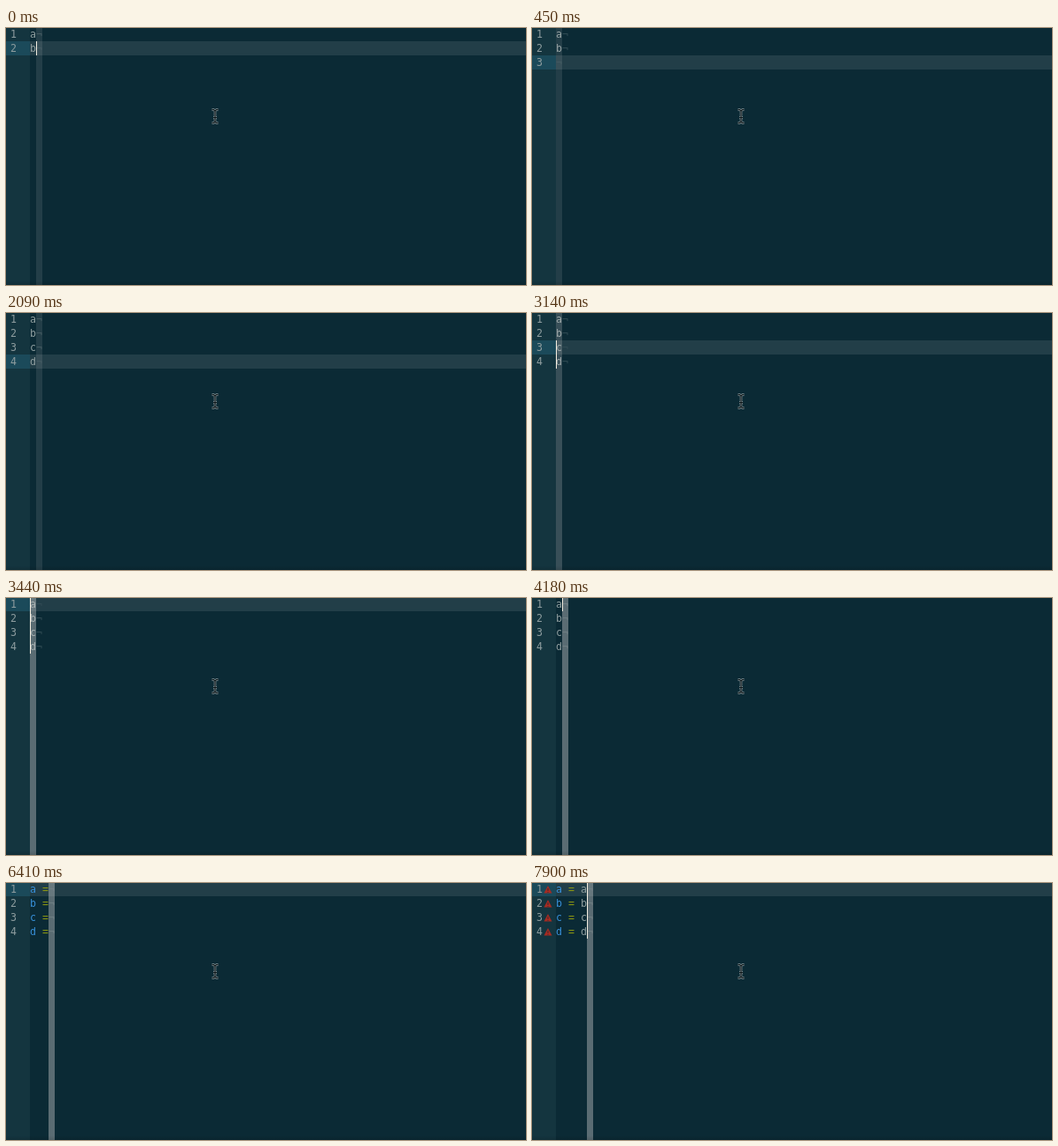
An HTML page with a canvas that plays this animation: 587x291 px, repeating every 8 s.

```html
<!DOCTYPE html>
<html lang="en">
<head>
<meta charset="utf-8">
<title>Multiple cursors</title>
<style>
  html, body { margin: 0; height: 100%; overflow: hidden; background: #0b2a35; }
  canvas { display: block; }
</style>
</head>
<body>
<canvas id="stage" width="587" height="291"></canvas>
<script>
const ctx = document.getElementById('stage').getContext('2d');
const W = 587, H = 291, GUTTER = 27, CELL = 7, ROW = 16, LOOP = 8000;
const rowTop = row => row * ROW - 17;
const cellX = col => GUTTER + col * CELL;

// Each step changes only the listed parts of the editor state.
// first/last: rows holding cursors; tail: text typed after each letter.
const steps = [
  [0, { count: 2, letters: 'ab', first: 2, last: 2, col: 1, caret: true, tail: '', active: true, warn: false }],
  [150, { count: 3, first: 3, last: 3, col: 0 }],
  [450, { caret: false }],
  [900, { caret: true }],
  [1200, { caret: false }],
  [1350, { letters: 'abc', col: 1 }],
  [1490, { caret: true }],
  [1640, { count: 4, first: 4, last: 4, col: 0 }],
  [1940, { caret: false }],
  [2090, { letters: 'abcd', col: 1 }],
  [2540, { col: 0, caret: true }],
  [2840, { caret: false }],
  [3140, { first: 3, caret: true }],
  [3290, { first: 2 }],
  [3440, { first: 1 }],
  [3740, { caret: false }],
  [4030, { col: 1, caret: true }],
  [4180, { active: false }],
  [5070, { active: true, caret: false }],
  [5220, { caret: true }],
  [5670, { caret: false }],
  [6120, { tail: ' ', col: 2 }],
  [6270, { caret: true }],
  [6410, { tail: ' =', col: 3, caret: false }],
  [6550, { tail: ' = ', col: 4, caret: true }],
  [6850, { caret: false, warn: true }],
  [7300, { caret: true }],
  [7750, { tail: ' = *', col: 5, caret: false }],
  [7900, { caret: true }]
];

function stateAt(time) {
  const state = {};
  for (const [start, change] of steps) if (start <= time) Object.assign(state, change);
  return state;
}

function box(color, x, y, w, h) {
  ctx.fillStyle = color;
  ctx.fillRect(x, y, w, h);
}

function glyph(char, x, row, color) {
  ctx.fillStyle = color;
  ctx.fillText(char, x, rowTop(row) + 12);
}

function drawLine(row, s) {
  glyph(row, 5, row, '#8d9c9e');
  const letter = s.letters[row - 1] || '';
  const text = letter && letter + s.tail.replace('*', letter);
  [...text].forEach((char, i) => {
    const color = char === '=' ? '#8f9b12' : i === 0 && text.includes('=') ? '#378fd8' : '#8f9e9f';
    glyph(char, cellX(i), row, color);
  });
  glyph('¬', cellX(text.length), row, '#304b53');
}

function drawWarning(row) {
  const y = rowTop(row);
  ctx.fillStyle = '#a62b22';
  ctx.fill(new Path2D(`M18 ${y + 4} l4.5 8.5 h-9 z`));
  box('#3c2a2c', 17.5, y + 7, 1, 3);
  box('#3c2a2c', 17.5, y + 11, 1, 1);
}

const beam = new Path2D('M232.5 92.5 h2 l1.5 1.5 l1.5 -1.5 h2 M236 94 V106 M232.5 107.5 h2 l1.5 -1.5 l1.5 1.5 h2 M234 101.5 h4');

function drawPointer() {
  for (const [color, width] of [['#8c999c', 2.6], ['#0b1518', 1.2]]) {
    ctx.strokeStyle = color;
    ctx.lineWidth = width;
    ctx.stroke(beam);
  }
}

function draw(s) {
  box('#0b2a35', 0, 0, W, H);
  box('#14353f', 0, 0, GUTTER, H);
  if (s.active) {
    box('#1b4a5a', 0, rowTop(s.first), GUTTER, ROW);
    box('#223e48', GUTTER, rowTop(s.first), W - GUTTER, ROW);
  }
  ctx.font = '11.6px "DejaVu Sans Mono", monospace';
  for (let row = 1; row <= s.count; row++) {
    drawLine(row, s);
    if (s.warn) drawWarning(row);
  }
  // Every cursor adds one translucent layer to the column highlight.
  for (let row = s.first; row <= s.last; row++) {
    box('rgba(200,205,200,.12)', cellX(s.col), 0, CELL, H);
  }
  const lastCaret = s.active ? s.last : s.first;
  for (let row = s.first; s.caret && row <= lastCaret; row++) {
    box('#f3ede0', cellX(s.col), rowTop(row), 1, ROW);
  }
  const shade = ctx.createLinearGradient(0, H - 5, 0, H);
  shade.addColorStop(0, 'rgba(0,0,0,0)');
  shade.addColorStop(1, 'rgba(0,0,0,.12)');
  box(shade, 0, H - 5, W, 5);
  drawPointer();
}

function tick() {
  draw(stateAt(performance.now() % LOOP));
  requestAnimationFrame(tick);
}
tick();
</script>
</body>
</html>
```
